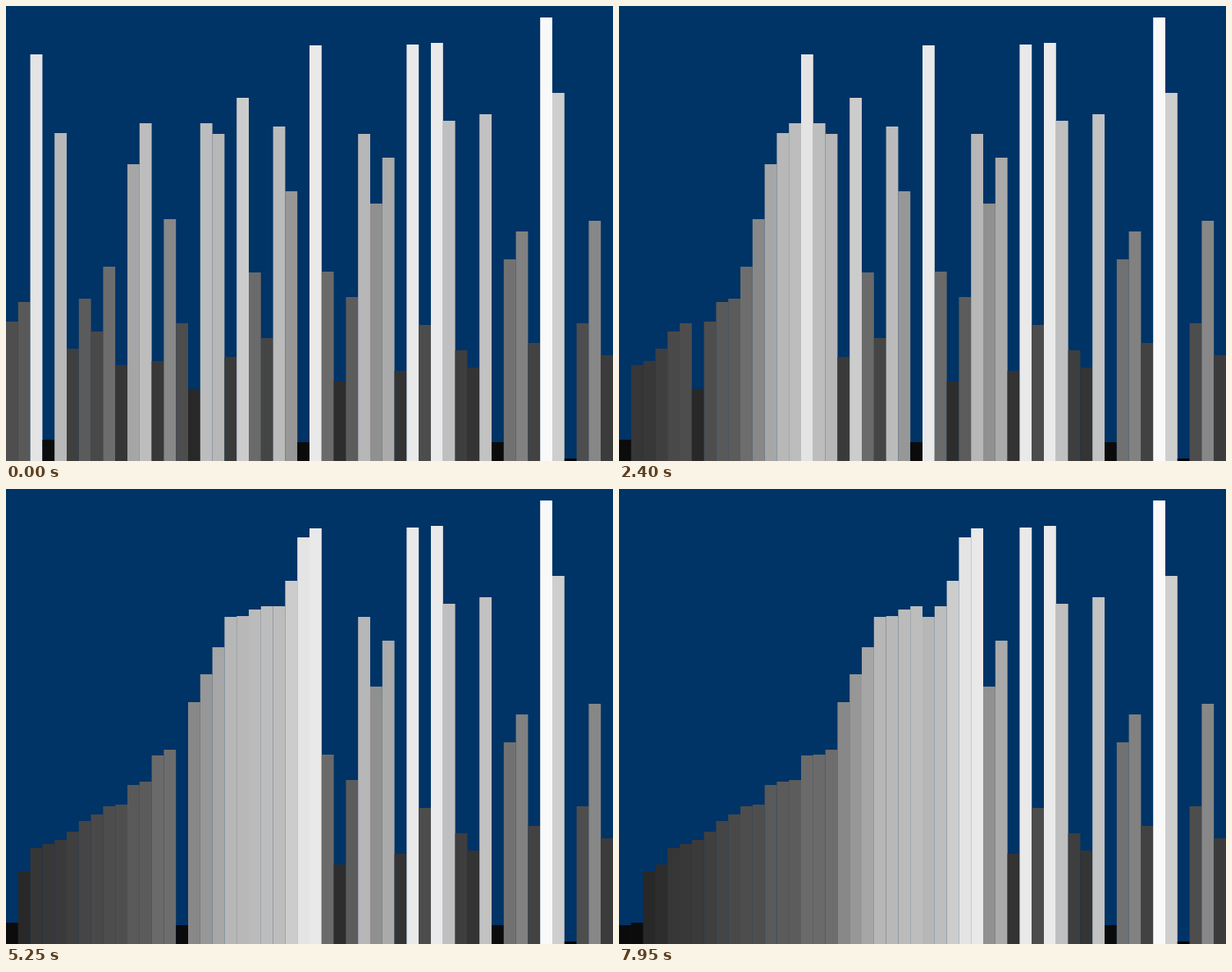
Write an HTML page that moves like this. It is 740 px wide and 555 px high and loops after 8000 ms.

```html
<!DOCTYPE html>
<html lang="en">
<head>
<meta charset="utf-8">
<title>Insertion sort</title>
<style>
  html, body { margin: 0; width: 100%; height: 100%; overflow: hidden; background: #036; }
  svg { display: block; width: 740px; height: 555px; }
</style>
</head>
<body>
<svg id="stage" viewBox="0 0 740 555"></svg>
<script>
const W = 740, H = 555, LOOP = 8000, TICK = 50, SWAP = 40;

// The unsorted values; everything else follows from them.
const values = [
  170, 194, 496, 26, 400, 137, 198, 158, 237, 117,
  362, 412, 122, 295, 168, 88, 412, 399, 127, 443,
  230, 150, 408, 329, 23, 507, 231, 97, 200, 399,
  314, 370, 110, 508, 166, 510, 415, 135, 114, 423,
  23, 246, 280, 144, 541, 449, 3, 168, 293, 129
];
const barWidth = W / values.length;

const stage = document.getElementById('stage');
const bars = values.map((_, i) => {
  const bar = document.createElementNS('http://www.w3.org/2000/svg', 'rect');
  bar.setAttribute('x', i * barWidth);
  bar.setAttribute('width', barWidth);
  return stage.appendChild(bar);
});

// Insertion sort by neighbour swaps, stopped after the given number of them.
function sortFor(swaps) {
  const list = values.slice();
  for (let i = 1; i < list.length; i++) {
    for (let j = i; j > 0 && list[j] < list[j - 1]; j--) {
      if (swaps-- <= 0) return list;
      [list[j - 1], list[j]] = [list[j], list[j - 1]];
    }
  }
  return list;
}

function shade(value) {
  const v = Math.round(255 * value / H);
  return `rgb(${v},${v},${v})`;
}

let shown = -1;

function draw(time) {
  const tick = Math.floor((time % LOOP) / TICK) * TICK;
  const swaps = Math.round(tick / SWAP);
  if (swaps === shown) return;
  shown = swaps;
  sortFor(swaps).forEach((value, i) => {
    bars[i].setAttribute('y', H - value);
    bars[i].setAttribute('height', value);
    bars[i].setAttribute('fill', shade(value));
  });
}

const start = performance.now();

function frame() {
  draw(performance.now() - start);
  requestAnimationFrame(frame);
}

draw(0);
requestAnimationFrame(frame);
</script>
</body>
</html>
```
